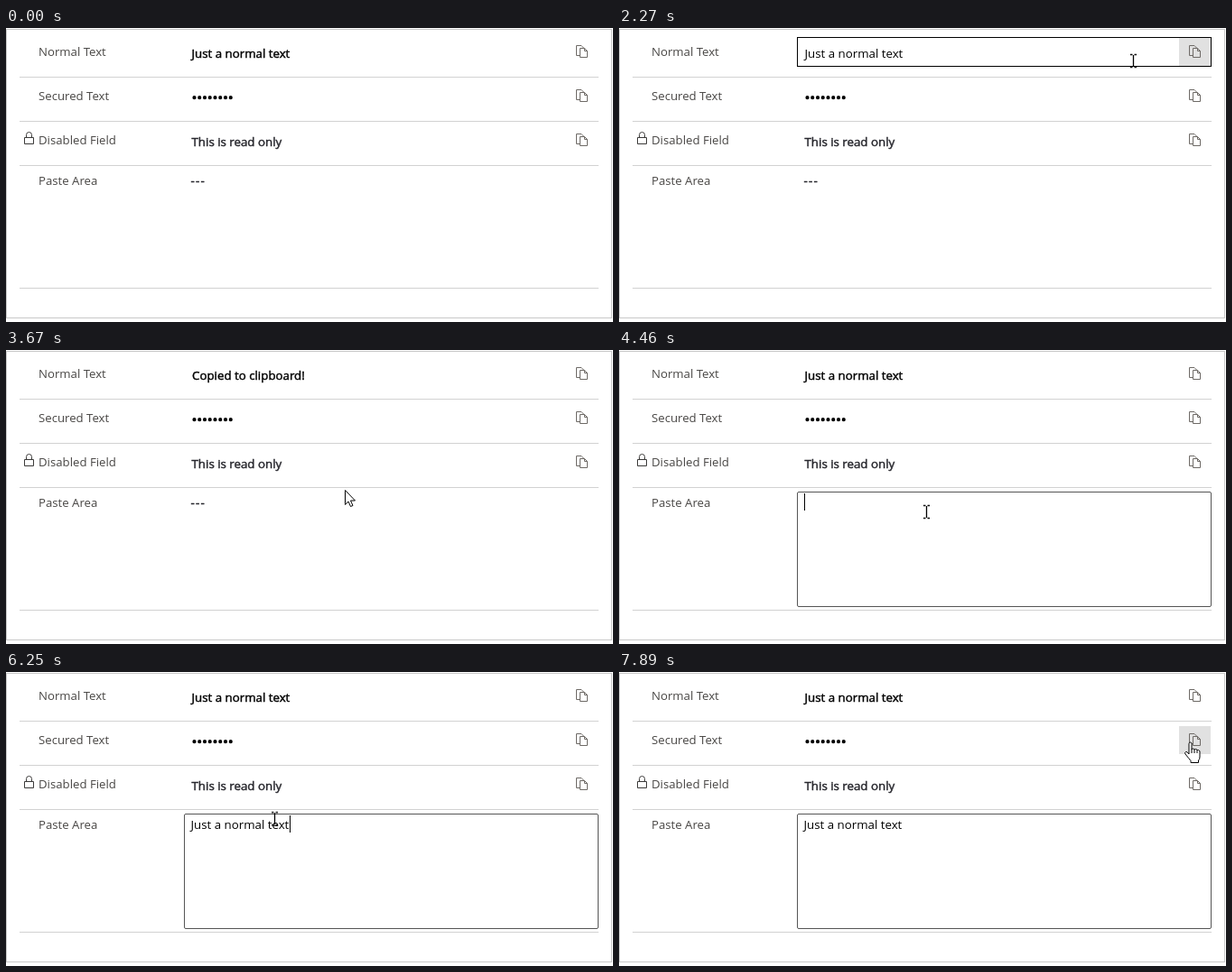
Write an HTML page that moves like this. It is 672 px wide and 326 px high and loops after 8000 ms.

```html
<!DOCTYPE html>
<html lang="en">
<head>
<meta charset="utf-8">
<title>Copy to clipboard field</title>
<style>
html, body { margin: 0; width: 100%; height: 100%; overflow: hidden; background: #fff; }
svg { display: block; width: 672px; height: 326px; }
text { font: 13.3px "Open Sans", "Noto Sans", sans-serif; white-space: pre; }
.label { font-size: 13.2px; fill: #484644; }
.bold { stroke: #000; stroke-width: .45px; }
.soft { fill: #25252b; stroke: #25252b; }
.line { fill: none; stroke: #d2d2d2; }
.box { fill: none; stroke: #000; }
.btn { fill: #e1e1e1; }
.caret { stroke: #000; }
.ring { fill: rgba(255, 255, 0, .47); }
.ptr { fill: #fff; stroke: #000; stroke-linejoin: round; }

/* everything runs on one 8 s clock: 1% = 80 ms */
.anim { animation: 8s step-end infinite; }
#cursor { animation-name: move; }
#arrow { animation-name: arrow; }
#beam { animation-name: beam; }
#hand { animation-name: hand; }
#ring { animation-name: ring; }
#idle1 { animation-name: idle1; }
#edit1 { animation-name: edit1; }
#btn1 { animation-name: btn1; }
#copied { animation-name: copied; }
#caret1 { animation-name: caret1; }
#idle2 { animation-name: idle2; }
#edit2 { animation-name: edit2; }
#btn2 { animation-name: btn2; }
#area { animation-name: area; }
#empty { animation-name: empty; }
#pasted { animation-name: pasted; }
#caret3 { animation-name: caret3; }
#caret4 { animation-name: caret4; }
#tip { animation-name: tip; }

@keyframes move {
  0% { transform: translate(4px, 225px); }
  1.5% { transform: translate(4px, 225px); animation-timing-function: steps(3); }
  4.34% { transform: translate(200px, 50px); animation-timing-function: steps(4); }
  8.125% { transform: translate(237px, 32px); }
  19% { transform: translate(237px, 32px); animation-timing-function: steps(9); }
  28.375% { transform: translate(569px, 36px); }
  29.375% { transform: translate(585px, 36px); animation-timing-function: steps(5); }
  34.25% { transform: translate(631px, 33px); }
  43.5% { transform: translate(600px, 50px); }
  44.375% { transform: translate(520px, 90px); }
  45.25% { transform: translate(440px, 128px); }
  45.875% { transform: translate(375px, 155px); }
  46.875% { transform: translate(352px, 172px); }
  47.875% { transform: translate(343px, 178px); }
  48.75% { transform: translate(340px, 179px); }
  73.375% { transform: translate(328px, 181px); animation-timing-function: steps(3); }
  76.25% { transform: translate(312px, 186px); animation-timing-function: steps(4); }
  80.09% { transform: translate(252px, 91px); animation-timing-function: steps(2); }
  82% { transform: translate(242px, 79px); }
  86.75% { transform: translate(242px, 79px); animation-timing-function: steps(7); }
  93.375% { transform: translate(634px, 78px); }
  95.5%, 100% { transform: translate(632px, 78px); }
}
@keyframes arrow {
  0%, 6.22%, 46.875%, 80.09%, 100% { opacity: 0; }
  1.5%, 43.5%, 78.16% { opacity: 1; }
}
@keyframes beam {
  0%, 33.27%, 78.16%, 95.5%, 100% { opacity: 0; }
  6.22%, 46.875%, 80.09% { opacity: 1; }
}
@keyframes hand {
  0%, 43.5% { opacity: 0; }
  33.27%, 95.5%, 100% { opacity: 1; }
}
@keyframes ring {
  0%, 19%, 36.25%, 53.875%, 98.625%, 100% { opacity: 0; }
  17%, 34.25%, 52.875%, 97.375% { opacity: 1; }
}
@keyframes idle1 { 0%, 50.875%, 100% { opacity: 1; } 6.22% { opacity: 0; } }
@keyframes edit1 { 0%, 38.125%, 100% { opacity: 0; } 6.22% { opacity: 1; } }
@keyframes btn1 { 0%, 43.5%, 100% { opacity: 0; } 6.22% { opacity: 1; } }
@keyframes copied { 0%, 50.875%, 100% { opacity: 0; } 38.125% { opacity: 1; } }
@keyframes caret1 { 0%, 23.625%, 36.875%, 100% { opacity: 0; } 17%, 30.25% { opacity: 1; } }
@keyframes idle2 { 0%, 95.5%, 100% { opacity: 1; } 80.09% { opacity: 0; } }
@keyframes edit2 { 0%, 95.5%, 100% { opacity: 0; } 80.09% { opacity: 1; } }
@keyframes btn2 { 0% { opacity: 0; } 80.09%, 100% { opacity: 1; } }
@keyframes area { 0% { opacity: 0; } 47.875%, 100% { opacity: 1; } }
@keyframes empty { 0% { opacity: 1; } 52.875%, 100% { opacity: 0; } }
@keyframes pasted { 0% { opacity: 0; } 63.625%, 100% { opacity: 1; } }
@keyframes caret3 { 0%, 59.75%, 100% { opacity: 0; } 52.875% { opacity: 1; } }
@keyframes caret4 {
  0%, 69.375%, 82%, 95.5%, 100% { opacity: 0; }
  63.625%, 76%, 88.625% { opacity: 1; }
}
@keyframes tip { 0%, 55.75%, 100% { opacity: 0; } 51.875% { opacity: 1; } }
</style>
</head>
<body>
<svg viewBox="0 0 672 326">
  <defs>
    <g id="copy" fill="none" stroke="#6e6a66">
      <path d="M635 30.5H631.5V19.5H637L639.5 22"/>
      <path d="M635.5 22.5H640.5L643.5 25.5V32.5H635.5ZM640.5 22.5V25.5H643.5"/>
    </g>
    <path id="dots" d="M208.5 77.2H249.5" fill="none" stroke="#000" stroke-linecap="round" stroke-dasharray="0 5.75"/>
  </defs>

  <rect class="line" x=".5" y="1.5" width="670" height="320" style="stroke:#c8c8c8"/>
  <path class="line" d="M15 54.5H656M15 103.5H656M15 152.5H656M15 288.5H656"/>

  <text class="label" x="36" y="31">Normal Text</text>
  <text class="label" x="36" y="80">Secured Text</text>
  <text class="label" x="36" y="129">Disabled Field</text>
  <text class="label" x="36" y="174">Paste Area</text>
  <path d="M20.5 121.5H30.5V128.5H20.5ZM22.5 121V118.5a3 3 0 0 1 6 0V121" fill="none" stroke="#3b3a39"/>

  <rect id="btn1" class="btn anim" x="620" y="11" width="35" height="31"/>
  <text id="idle1" class="bold anim" x="205.5" y="33">Just a normal text</text>
  <g id="edit1" class="anim">
    <rect class="box" x="197.5" y="10.5" width="458" height="32"/>
    <text x="205.5" y="33">Just a normal text</text>
  </g>
  <text id="copied" class="bold anim" x="206" y="33">Copied to clipboard!</text>
  <path id="caret1" class="caret anim" d="M241.5 18V37"/>

  <rect id="btn2" class="btn anim" x="620" y="60" width="35" height="31"/>
  <use id="idle2" class="anim" href="#dots" stroke-width="4.2"/>
  <g id="edit2" class="anim">
    <rect class="box" x="197.5" y="59.5" width="458" height="32"/>
    <use href="#dots" stroke-width="3.5"/>
  </g>

  <text class="bold soft" x="205.5" y="131">This is read only</text>

  <use href="#copy"/>
  <use href="#copy" y="49"/>
  <use href="#copy" y="98"/>

  <rect id="area" class="box anim" x="197.5" y="157.5" width="458" height="127" rx="1.5" style="stroke:#555"/>
  <text id="empty" class="bold soft anim" x="204.5" y="174" letter-spacing="1.2">---</text>
  <text id="pasted" class="anim" x="204.5" y="174">Just a normal text</text>
  <path id="caret3" class="caret anim" d="M205.5 159V178"/>
  <path id="caret4" class="caret anim" d="M314.5 159V178"/>

  <g id="tip" class="anim">
    <rect x="348.5" y="193.5" width="119" height="24" fill="#fff" stroke="#8a8a8a"/>
    <text x="357" y="210" style="font-size:11.3px" fill="#575757">Select to enter data</text>
  </g>

  <g id="cursor" class="anim">
    <circle id="ring" class="ring anim" r="15"/>
    <path id="arrow" class="ptr anim" d="M.5 .5V16.5L4 13L6.5 18.5L9 17.5L6.5 12H11.5Z"/>
    <path id="beam" class="anim" d="M-3 -6.5H-.5M1.5 -6.5H4M.5 -6V7M-3 7.5H-.5M1.5 7.5H4" fill="none" stroke="#000" stroke-width="1.3"/>
    <g id="hand" class="ptr anim">
      <path d="M-1 1.5a1.5 1.5 0 0 1 3 0V8q0-1 1.5-1t1.5 1.5q0-1 1.5-1t1.5 1.5q.5-.8 1.5-.5t1.5 1.5V16q0 3-1.5 4V22.5H1V20.5Q-1 18-5 13q-1-2 .5-2.5t3.5 2.5z"/>
      <path d="M2 8V12M5 8.5V12M8 9V12"/>
    </g>
  </g>
</svg>
</body>
</html>
```
